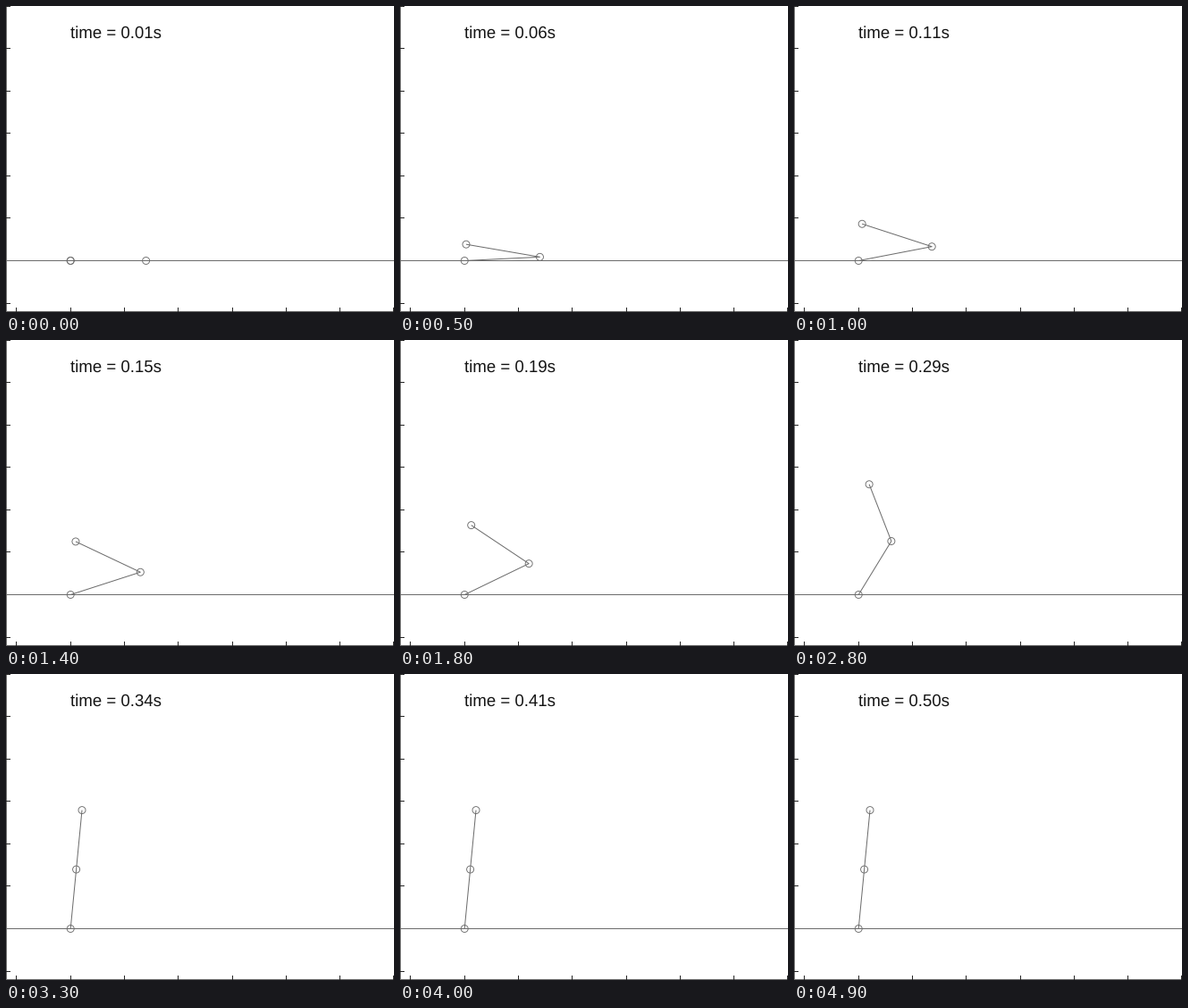
Animation, 434 px wide and 343 px high, one loop 5 s. Source, as a matplotlib script:

```python
import numpy as np
import matplotlib.pyplot as plt
from matplotlib.animation import FuncAnimation
from matplotlib.patches import Circle

WIDTH, HEIGHT, DPI = 434, 343, 100
PX = 72 / DPI                        # one pixel in points
FRAMES, INTERVAL = 50, 100

ORIGIN = np.array([72.2, 285.5])     # the fixed joint, in pixels
TICK = np.array([60.3, -47.6])       # one tick step, in pixels
LINK = 1.4                           # link length, in tick steps
LEAN = np.radians(85.65)             # direction in which the free end rises
FIRST_MOVE, LAST_MOVE = 1, 30

LINE_COLOR, TICK_COLOR, TEXT_COLOR = "#6c6c6c", "#262626", "#141414"

plt.rcParams.update({"font.family": "Liberation Sans",
                     "text.hinting": "none",
                     "text.kerning_factor": 6})
fig = plt.figure(figsize=(WIDTH / DPI, HEIGHT / DPI), dpi=DPI, facecolor="white")
ax = fig.add_axes([0, 0, 1, 1])
ax.set(xlim=(0, WIDTH), ylim=(HEIGHT, 0))
ax.axis("off")


def stroke(xs, ys, color=LINE_COLOR):
    return ax.plot(xs, ys, color=color, lw=PX, solid_capstyle="butt",
                   snap=False)[0]


def pixel_center(value, size):
    return np.clip(np.floor(value), 0, size - 1) + 0.5


def draw_axes():
    stroke([0.5, 0.5], [0, HEIGHT])
    stroke([0, WIDTH], [HEIGHT - 0.5] * 2)
    for k in range(-1, 7):
        x, y = ORIGIN + k * TICK
        x, y = pixel_center(x, WIDTH), pixel_center(y, HEIGHT)
        stroke([x, x], [HEIGHT - 5, HEIGHT], TICK_COLOR)
        if k:
            stroke([0, 5], [y, y], TICK_COLOR)
    stroke([0, WIDTH], [ORIGIN[1]] * 2)


def polar(length, angle):
    return length * np.array([np.cos(angle), np.sin(angle)])


def joints(frame):
    """Pixel positions of the three joints while the free end rises evenly."""
    progress = np.clip((frame - FIRST_MOVE) / (LAST_MOVE - FIRST_MOVE), 0, 1)
    # Fully folded, the lower link rests on the ground.
    angle = LEAN - np.arccos(progress) if progress > 0 else 0
    points = [np.zeros(2), polar(LINK, angle), polar(2 * LINK * progress, LEAN)]
    return ORIGIN + np.array(points) * TICK


draw_axes()
leg = stroke([], [])
rings = [ax.add_patch(Circle((0, 0), 4, fill=False, ec=LINE_COLOR, lw=0.9 * PX,
                             zorder=3)) for _ in range(3)]
clock = ax.text(72, 36, "", fontsize=18.67 * PX, color=TEXT_COLOR,
                ha="left", va="baseline")


def update(frame):
    points = joints(frame)
    leg.set_data(*points.T)
    for ring, point in zip(rings, points):
        ring.center = point
    clock.set_text(f"time = {(frame + 1) / 100:.2f}s")
    return leg, *rings, clock


anim = FuncAnimation(fig, update, frames=FRAMES, interval=INTERVAL,
                     repeat=True, repeat_delay=0)
plt.show()
```
